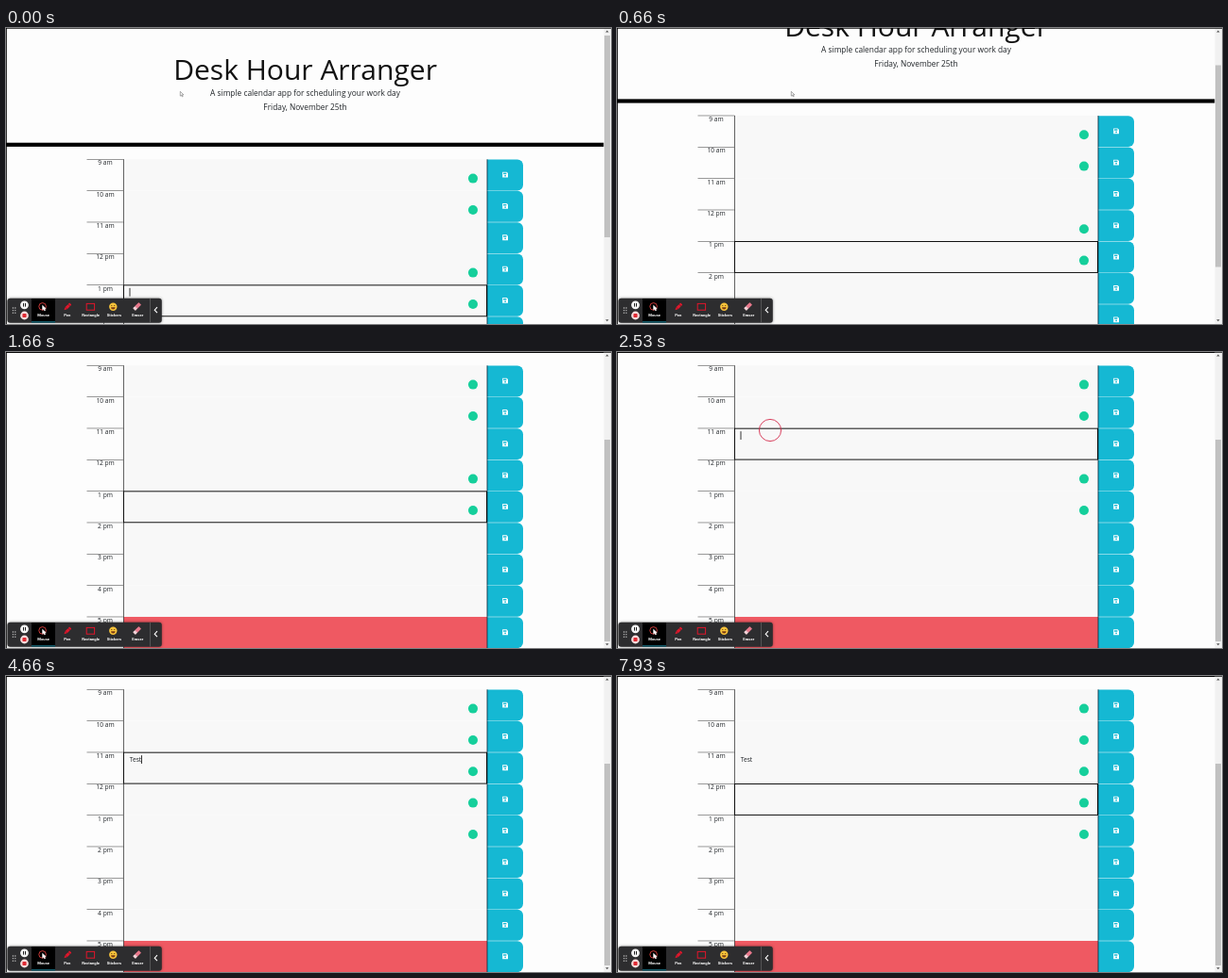
An HTML page with a canvas that plays this animation: 640 by 314 pixels, repeating every 8000 ms.

```html
<!DOCTYPE html>
<html lang="en">
<head>
<meta charset="utf-8">
<title>Desk Hour Arranger</title>
<style>
html, body { margin: 0; width: 100%; height: 100%; overflow: hidden; background: #fdfdfd; }
canvas { display: block; width: 640px; height: 314px; }
</style>
</head>
<body>
<canvas id="stage"></canvas>
<script>
const W = 640, H = 314, LOOP = 8000, BLINK = 530;
const ROW = 100 / 3, TOP = 139.3, MAX_SCROLL = 125;
const TEAL = '#15b8d3', RED = '#ef5962', GREEN = '#15cf9b', PEN = '#e0162b', INK = '#212529';
const SANS = '"Open Sans", "Noto Sans", sans-serif';
const HOURS = ['9 am', '10 am', '11 am', '12 pm', '1 pm', '2 pm', '3 pm', '4 pm', '5 pm'];
const KEYS = [3055, 3195, 3395, 3595];
const CLICKS = [{ t: 2390, x: 162, y: 83, row: 2 }, { t: 7320, x: 162, y: 129, row: 3 }];

const canvas = document.getElementById('stage');
const ctx = canvas.getContext('2d');
const dpr = window.devicePixelRatio || 1;
canvas.width = W * dpr;
canvas.height = H * dpr;

function rect(x, y, w, h, color) {
  ctx.fillStyle = color;
  ctx.fillRect(x, y, w, h);
}

function round(x, y, w, h, r, color) {
  ctx.fillStyle = color;
  ctx.beginPath();
  ctx.roundRect(x, y, w, h, r);
  ctx.fill();
}

function disc(x, y, r, color) {
  ctx.fillStyle = color;
  ctx.beginPath();
  ctx.arc(x, y, r, 0, 7);
  ctx.fill();
}

function poly(points, color) {
  ctx.fillStyle = color;
  ctx.beginPath();
  points.forEach(([x, y]) => ctx.lineTo(x, y));
  ctx.closePath();
  ctx.fill();
}

function line(points, color, width) {
  ctx.strokeStyle = color;
  ctx.lineWidth = width;
  ctx.beginPath();
  points.forEach(([x, y]) => ctx.lineTo(x, y));
  ctx.stroke();
}

function ring(x, y, r, color, width) {
  ctx.strokeStyle = color;
  ctx.lineWidth = width;
  ctx.beginPath();
  ctx.arc(x, y, r, 0, 7);
  ctx.stroke();
}

function text(s, x, y, size, color = INK, align = 'center', font = SANS, weight = 400) {
  ctx.font = `${weight} ${size}px ${font}`;
  ctx.textAlign = align;
  ctx.fillStyle = color;
  ctx.fillText(s, x, y);
}

function scrollAt(t) {
  const k = Math.min(1, Math.max(0, (t - 505) / 755));
  return MAX_SCROLL * (1 - (1 - k) ** 2);
}

function focusAt(t) {
  return CLICKS.reduce((row, c) => (t >= c.t ? c.row : row), 4);
}

// The blink restarts after each click or key press.
function caretOn(t) {
  const resets = [-390, ...CLICKS.map(c => c.t), ...KEYS];
  const last = Math.max(...resets.filter(r => r <= t));
  return Math.floor((t - last) / BLINK) % 2 === 0;
}

function header(scroll) {
  text('Desk Hour Arranger', 316.5, 55 - scroll, 30, '#111');
  text('A simple calendar app for scheduling your work day', 316.5, 72 - scroll, 8.33);
  text('Friday, November 25th', 316.5, 87 - scroll, 8.33);
  rect(0, 121.7 - scroll, 632.5, 4.2, '#000');
}

function saveButton(y) {
  round(509, y + 0.2, 38, ROW - 0.4, [0, 6, 6, 0], TEAL);
  rect(508.6, y, 0.8, ROW, '#123');
  const x = 525.2, top = y + 13.4;
  poly([[x, top], [x + 4.5, top], [x + 5.8, top + 1.3], [x + 5.8, top + 5.8], [x, top + 5.8]], '#fff');
  rect(x + 0.9, top + 0.9, 3.3, 1.5, TEAL);
  disc(x + 2.9, top + 4, 0.9, TEAL);
}

function schedule(t, scroll) {
  const focus = focusAt(t);
  const typed = 'Test'.slice(0, KEYS.filter(k => t >= k).length);
  HOURS.forEach((hour, i) => {
    const y = TOP + i * ROW - scroll;
    rect(124.5, y, 384.5, ROW + 0.2, i === 8 ? RED : '#f8f8f8');
  });
  HOURS.forEach((hour, i) => {
    const y = TOP + i * ROW - scroll;
    rect(85.5, y - 0.3, 39, 0.6, '#555');
    rect(124, y, 0.7, ROW, '#222');
    text(hour, 105, y + 6, 6.67);
    saveButton(y);
    if (i < 2 || i === 3 || i === 4 || (i === 2 && t >= 3860)) disc(494, y + 20.3, 5, GREEN);
  });
  const y = TOP + focus * ROW - scroll;
  ctx.strokeStyle = '#111';
  ctx.lineWidth = 1;
  ctx.strokeRect(124.5, y + 0.2, 384, ROW - 0.4);

  text(typed, 130.7, TOP + 2 * ROW - scroll + 9.7, 6.67, INK, 'left');
  if (caretOn(t)) {
    const x = 130.6 + (focus === 2 ? ctx.measureText(typed).width : 0);
    rect(x, y + 3.2, 0.8, 8.8, '#000');
  }
}

function scrollbar(scroll) {
  rect(632.5, 0, 7.5, H, '#f1f1f1');
  rect(633, 8 + scroll * 0.68, 6, 214, '#c1c1c1');
  poly([[634.2, 4.6], [637.6, 4.6], [635.9, 2.6]], '#505050');
  poly([[634.2, 309.2], [637.6, 309.2], [635.9, 311.2]], '#505050');
  rect(0, 0, 0.8, H, '#000');
  rect(0, 0, W, 0.7, '#000');
}

function arrow(x, y, s, fill, edge) {
  const shape = [[0, 0], [0, 5], [1.2, 3.9], [2.1, 5.8], [3, 5.4], [2.1, 3.6], [3.7, 3.6], [0, 0]]
    .map(([a, b]) => [x + a * s, y + b * s]);
  poly(shape, fill);
  line(shape, edge, 0.5);
}

function tilted(x, y, angle, draw) {
  ctx.save();
  ctx.translate(x, y);
  ctx.rotate(angle);
  draw();
  ctx.restore();
}

function toolbar() {
  ctx.save();
  ctx.shadowColor = 'rgba(0,0,0,.45)';
  ctx.shadowBlur = 3 * dpr;
  round(1.5, 286.8, 163.3, 26, 3, '#2d2d2f');
  ctx.restore();

  for (let i = 0; i < 6; i++) disc(7.4 + (i % 2) * 2.4, 297 + (i >> 1) * 2.6, 0.65, '#ddd');

  disc(19.5, 293.8, 4.4, '#f4f4f4');
  rect(18, 292, 1, 3.6, '#222');
  rect(20, 292, 1, 3.6, '#222');
  disc(19.5, 305, 4.4, '#f6dcdc');
  round(17.4, 302.9, 4.2, 4.2, 0.8, '#e02b35');

  rect(27, 287, 25, 25.5, '#000');
  rect(27, 311.4, 25, 1, '#1b8fa8');
  ring(38.6, 295.4, 3.8, '#e0403f', 0.9);
  arrow(38.6, 294.2, 1, '#fff', '#fff');

  tilted(65, 295.8, Math.PI / 4, () => {
    round(-1.5, -4.6, 3, 2, 0.5, PEN);
    rect(-1.5, -2.2, 3, 4, PEN);
    poly([[-1.5, 2.1], [1.5, 2.1], [0, 5]], PEN);
  });

  ctx.strokeStyle = PEN;
  ctx.lineWidth = 1;
  ctx.strokeRect(85.2, 292.4, 8.4, 6.8);

  disc(113.3, 295.7, 4.2, '#f8c33a');
  disc(111.8, 294.5, 0.6, '#4a3210');
  disc(114.8, 294.5, 0.6, '#4a3210');
  ctx.fillStyle = '#7a3b14';
  ctx.beginPath();
  ctx.arc(113.3, 296.3, 2.3, 0, Math.PI);
  ctx.fill();

  tilted(138.5, 295.6, Math.PI / 4, () => {
    round(-1.9, -4.6, 3.8, 6, 0.6, '#e8788c');
    round(-1.9, 1, 3.8, 3.2, 0.6, '#f3d3d8');
  });

  [['Mouse', 39.7], ['Pen', 64.8], ['Rectangle', 89.6], ['Stickers', 114.4], ['Eraser', 139.3]]
    .forEach(([s, x]) => text(s, x, 305.7, 4.2, '#fff', 'center', 'Roboto, sans-serif', 700));

  rect(152, 287, 0.7, 25.5, '#666');
  line([[160, 296.2], [157.2, 299.2], [160, 302.2]], '#fff', 1.1);
}

function clickRings(t) {
  CLICKS.forEach(c => {
    const k = (t - c.t + 60) / 480;
    if (k < 0 || k > 1) return;
    ctx.globalAlpha = Math.min(1, 2 * (1 - k)) * 0.85;
    ring(c.x, c.y, 11.6 * Math.min(1, 0.35 + 1.6 * k), '#d32345', 1);
    ctx.globalAlpha = 1;
  });
}

function draw(t) {
  const scroll = scrollAt(t);
  ctx.setTransform(dpr, 0, 0, dpr, 0, 0);
  rect(0, 0, W, H, '#fdfdfd');
  header(scroll);
  schedule(t, scroll);
  scrollbar(scroll);
  if (scroll < 69) arrow(184.3, 67.4, 0.95, '#fff', '#555');
  clickRings(t);
  toolbar();
}

const start = performance.now();
function tick() {
  draw((performance.now() - start) % LOOP);
  requestAnimationFrame(tick);
}
tick();
</script>
</body>
</html>
```
